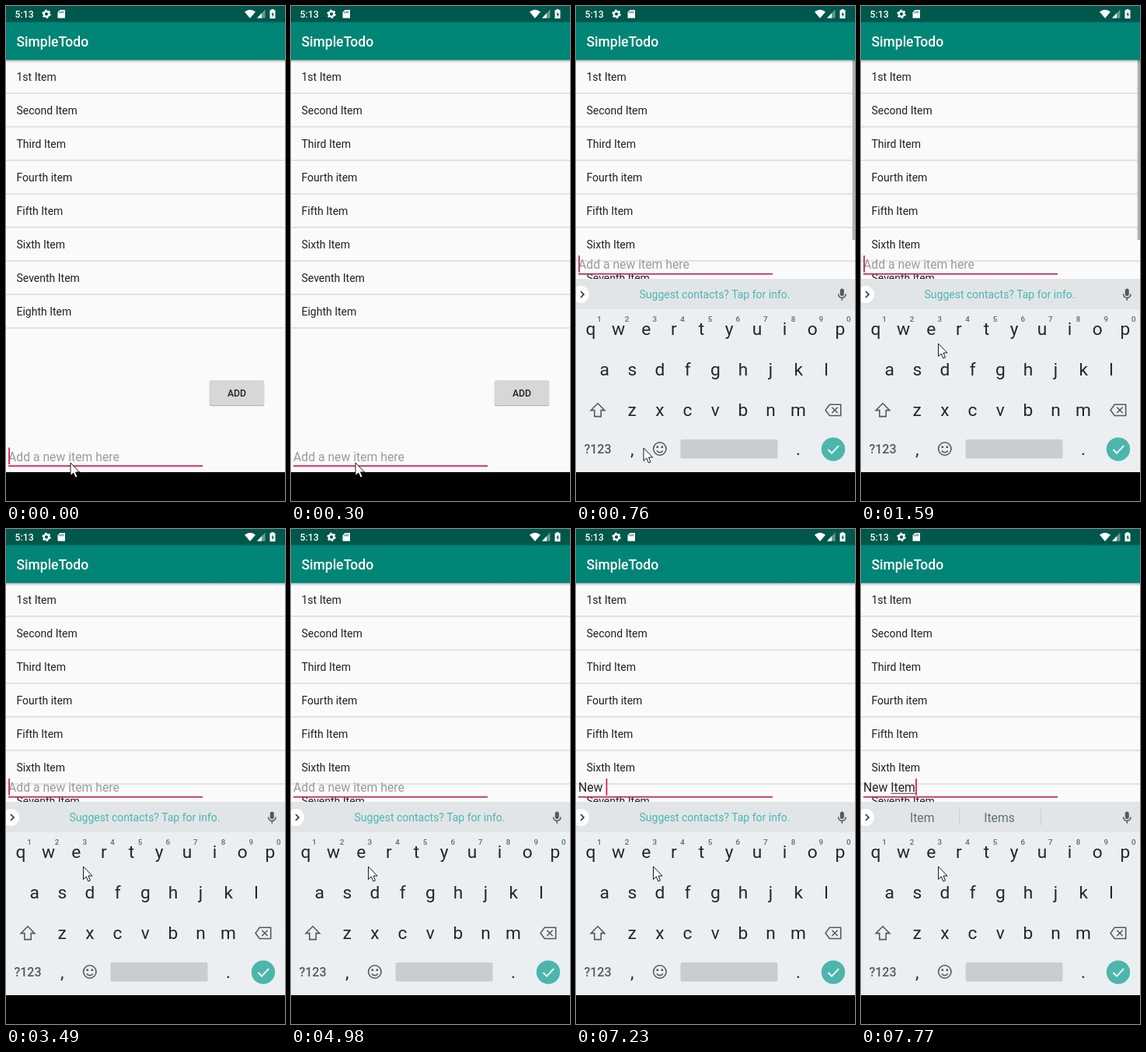
Animation of 359x635 px, one loop 8 s. Source, as an HTML page:

```html
<!DOCTYPE html>
<html lang="en">
<head>
<meta charset="utf-8">
<title>SimpleTodo</title>
<style>
  html, body { margin: 0; width: 100%; height: 100%; overflow: hidden; background: #000; }
  svg { display: block; width: 359px; height: 635px; }
  text { font-family: Roboto, "Noto Sans", sans-serif; white-space: pre; }
  .mid { text-anchor: middle; }
  .med { font-weight: 500; }
  .line { fill: none; stroke: #4f5b62; stroke-width: 1.6; }
</style>
</head>
<body>
<svg viewBox="0 0 359 635">
  <defs>
    <linearGradient id="shade" x2="0" y2="1">
      <stop stop-color="#000" stop-opacity=".28"/>
      <stop offset="1" stop-color="#000" stop-opacity="0"/>
    </linearGradient>
    <clipPath id="view"><rect id="viewBox" width="359" height="598"/></clipPath>
  </defs>

  <rect width="359" height="598" fill="#fafafa"/>
  <g id="list" font-size="14" fill="#212121" clip-path="url(#view)"></g>
  <rect id="scroll" x="355.7" y="69" width="3.3" height="231" fill="#b0b0b0"/>

  <g id="button">
    <rect x="261.5" y="481" width="71" height="32.5" rx="2.5" fill="#000" opacity=".13"/>
    <rect x="262" y="481" width="70" height="32" rx="2" fill="#000" opacity=".16"/>
    <rect x="262" y="480" width="70" height="32" rx="2" fill="#d6d7d7"/>
    <text class="mid med" x="297" y="500.5" font-size="12.25" fill="#212121">ADD</text>
  </g>

  <g id="edit">
    <rect id="under" x="3" y="589.2" width="250" height="1.7"/>
    <text id="field" x="3" y="583.6" font-size="15.75"></text>
    <rect id="compose" y="585" height="1" fill="#424242"/>
    <rect id="caret" y="566.5" width="1.75" height="21.5"/>
  </g>

  <rect y="69" width="359" height="4" fill="url(#shade)"/>
  <rect width="359" height="69.3" fill="#008577"/>
  <rect width="359" height="20.6" fill="#00574b"/>
  <text class="med" x="13.5" y="52" font-size="17.5" fill="#fff">SimpleTodo</text>
  <g fill="#fff">
    <text class="med" x="11.5" y="14.6" font-size="12.25">5:13</text>
    <circle cx="52" cy="10.3" r="3.3" fill="none" stroke="#fff" stroke-width="2.4"/>
    <circle cx="52" cy="10.3" r="4.9" fill="none" stroke="#fff" stroke-width="1.6" stroke-dasharray="2.4 2.73"/>
    <path d="M69.5 5H76V15.5H66.5V8z"/>
    <path d="M68.8 7.3v2M71 6.5v2.8M73.2 6.5v2.8" stroke="#00574b"/>
    <path d="M307 7.4Q314 2 321 7.4L314 15.8z"/>
    <path d="M333.5 4.5V15.5H323z" opacity=".4"/>
    <path d="M329 9.2V15.5H323z"/>
    <path d="M341.5 4h3v1.2h2V16h-7V5.2h2z"/>
    <path d="M343.6 7.2l-2.2 4h1.5v3l2.2-4h-1.5z" fill="#00574b"/>
  </g>
  <rect y="598" width="359" height="37"/>

  <g id="keyboard">
    <rect y="350" width="359" height="248" fill="#eceff1"/>
    <rect y="350" width="359" height="39" fill="#e1e5e8"/>
    <circle cx="6" cy="370" r="11" fill="#fff"/>
    <path d="M6 366l4 4-4 4" fill="none" stroke="#263238" stroke-width="1.6"/>
    <text id="tip" class="mid" x="178.5" y="375" font-size="14" fill="#4db6ac">Suggest contacts? Tap for info.</text>
    <g id="words" class="mid" font-size="15.75" fill="#607078">
      <text x="78.7" y="376"></text><text x="178" y="376"></text><text x="282" y="376"></text>
      <path d="M126.5 359v21M231.5 359v21" stroke="#c9ced1"/>
    </g>
    <rect x="339.8" y="362.5" width="5" height="9.6" rx="2.5" fill="#4f5b62"/>
    <path class="line" d="M337.6 369.5a4.7 4.7 0 0 0 9.4 0M342.3 374v3.8"/>
    <g id="keys" class="mid" font-size="22.75" fill="#1c2a31"></g>
    <path class="line" d="M28 509.8l8.8 8.8h-4.6v8h-8.4v-8h-4.6z"/>
    <path class="line" d="M326.3 511.3h14.4v14.2h-14.4l-5.2-7.1zM329.3 514.8l7.4 7.2M336.7 514.8l-7.4 7.2"/>
    <text class="mid med" x="28" y="574.3" font-size="16" fill="#4f5b62">?123</text>
    <circle class="line" cx="107.8" cy="568" r="8.2"/>
    <path class="line" d="M103.8 570.5q4 4.5 8 0"/>
    <path d="M103.5 564.5h2.6v2.4h-2.6zM109.5 564.5h2.6v2.4h-2.6z" fill="#4f5b62"/>
    <rect x="134.5" y="556" width="125" height="24.5" rx="2.5" fill="#c9cdd0"/>
    <circle cx="331" cy="568.6" r="15.2" fill="#4db6ac"/>
    <path d="M324.5 569l4.6 4.6 9-9.4" fill="none" stroke="#fff" stroke-width="1.8"/>
  </g>

  <path id="mouse" d="M0 0V16.5L3.8 13 6.4 19 9 17.9 6.5 12H11.6z" fill="#fff" stroke="#000" stroke-width=".9"/>
</svg>
<script>
const $ = id => document.getElementById(id);
const show = (id, on) => $(id).style.display = on ? "" : "none";
const set = (id, attrs) => { for (const k in attrs) $(id).setAttribute(k, attrs[k]); };

// Static rows and keys
$("list").innerHTML = ["1st Item", "Second Item", "Third Item", "Fourth item",
  "Fifth Item", "Sixth Item", "Seventh Item", "Eighth Item"].map((s, i) =>
  `<text x="13.5" y="${96 + 43 * i}">${s}</text>
   <rect y="${111 + 43 * i}" width="359" height="2" fill="#e2e2e2"/>`).join("");

const row = (letters, x, y) => [...letters].map((c, i) =>
  `<text x="${x + 35.65 * i}" y="${y}">${c}</text>`).join("");
$("keys").innerHTML = row("qwertyuiop", 19, 421.7) + row("asdfghjkl", 36.7, 473.7) +
  row("zxcvbnm", 72.2, 525.5) + row(",", 72.2, 576) + row(".", 286, 576) +
  `<g class="med" font-size="9.8" fill="#5b686f">${row("1234567890", 30, 405.3)}</g>`;

// Keyframes: each entry holds until the next one
const blinks = [0, 140, 610, 1030, 1590, 2020, 2530, 3060, 3490, 4050, 4450,
  4980, 5510, 6040, 6170, 6620, 6990];
const typed = [[0, ""], [6170, "N"], [6990, "Ne"], [7110, "New"], [7230, "New "],
  [7530, "New I"], [7650, "New It"], [7770, "New Item"]];
const offers = [[0, null], [7380, ["years", "one", "is"]], [7530, ["I", "It", "I'm"]],
  [7650, ["It", "Item", "I'm"]], [7770, ["Item", "Items", ""]]];
const mouse = [[0, "83 586"], [610, "87 569"], [760, "87 567"], [910, "94 500"], [1030, "99.5 433"]];
const fade = [[0, 0], [610, 1], [2020, .67], [2140, .33], [2260, 0]];
const at = (frames, t) => frames.filter(f => f[0] <= t).pop()[1];

function render(t) {
  const open = t >= 610, sliding = t < 760;
  show("button", !open);
  show("keyboard", open);
  set("keyboard", { transform: `translate(0 ${sliding ? 7.3 : 0})`, opacity: sliding ? .84 : 1 });
  set("viewBox", { height: open ? 350.5 : 598 });
  set("scroll", { opacity: at(fade, t) });
  set("mouse", { transform: `translate(${at(mouse, t)})` });

  const text = at(typed, t), field = $("field");
  set("edit", { transform: `translate(0 ${open ? -246.3 : 0})` });
  set("under", { fill: open ? "#c02850" : "#d81b60" });
  field.textContent = text || "Add a new item here";
  set("field", { fill: text ? "#212121" : "#9b9b9b" });

  const width = n => n ? field.getSubStringLength(0, n) : 0;
  const end = 3 + width(text.length);
  const start = 3 + width(text.lastIndexOf(" ") + 1);
  set("compose", { x: start, width: Math.max(0, end - start) });
  set("caret", { x: end + .2, fill: open && !text ? "#c02850" : "#d81b60" });
  show("caret", blinks.filter(b => b <= t).length % 2);

  const words = at(offers, t);
  show("tip", !words);
  show("words", words);
  if (words) words.forEach((w, i) => $("words").children[i].textContent = w);
}

function tick() {
  render(performance.now() % 8000);
  requestAnimationFrame(tick);
}
tick();
</script>
</body>
</html>
```
